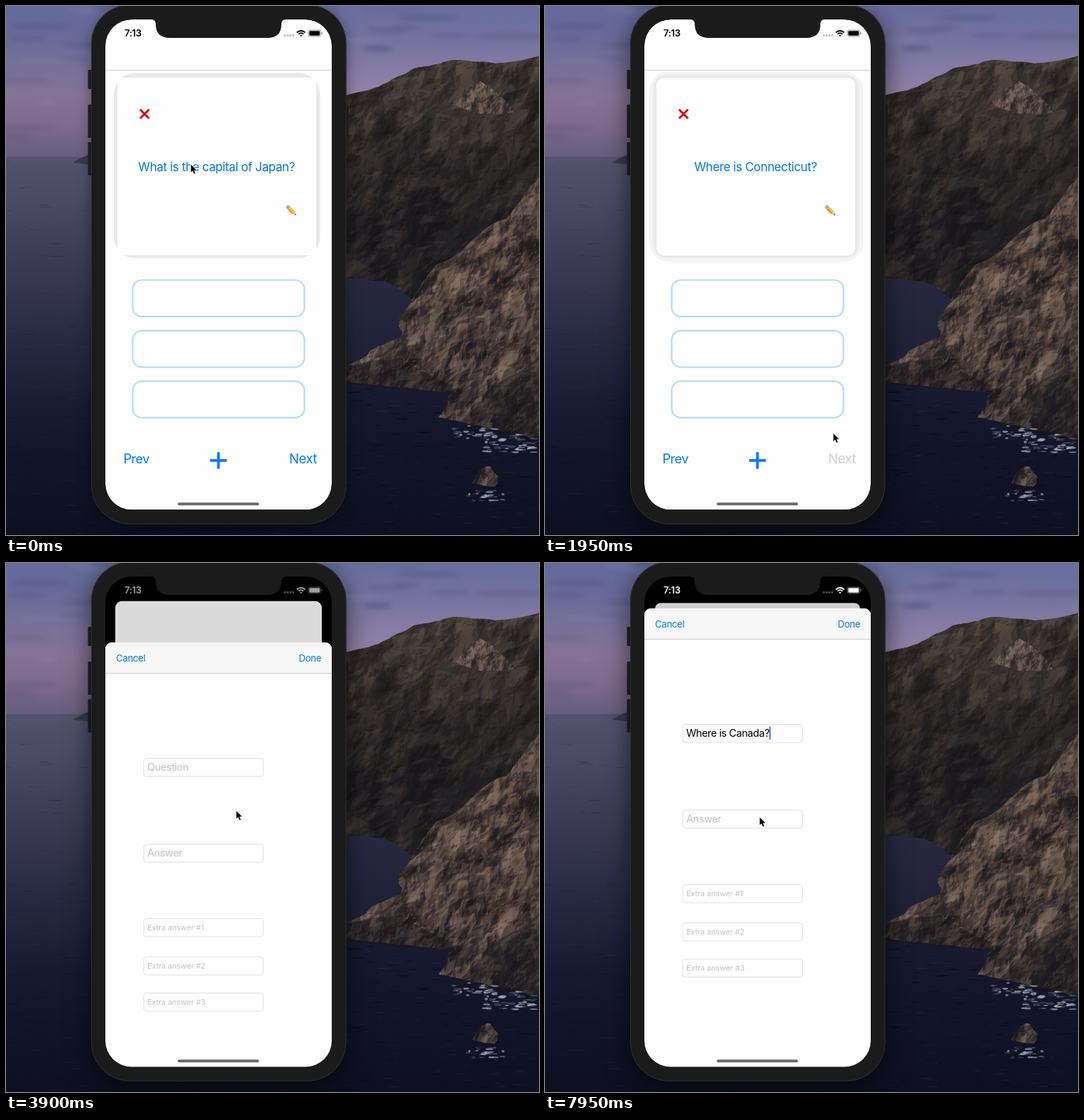
An HTML page with a canvas for the animation above (8 s loop, 751 by 746 pixels).

```html
<!DOCTYPE html>
<html lang="en">
<head>
<meta charset="utf-8">
<title>Flashcards</title>
<style>
html, body { margin: 0; width: 100%; height: 100%; overflow: hidden; background: #15172e; }
canvas { display: block; width: 751px; height: 746px; }
</style>
</head>
<body>
<canvas id="stage" width="751" height="746"></canvas>
<script>
const W = 751, H = 746, LOOP = 8000, STEP = 150;
const BLUE = '#007aff', PALE = '#b3dbff', PAPER = '#fefefe';
const SCREEN = { x: 140, y: 19, w: 319, h: 691.5 };
const stage = document.getElementById('stage').getContext('2d');
let g = stage;

const clamp = v => Math.max(0, Math.min(1, v));
const mix = (a, b, k) => a + (b - a) * k;
const ease = k => k * k * (3 - 2 * k);

function box(x, y, w, h, r, fill, stroke, line = 1) {
  g.beginPath();
  g.roundRect(x, y, w, h, r);
  if (fill) { g.fillStyle = fill; g.fill(); }
  if (stroke) { g.strokeStyle = stroke; g.lineWidth = line; g.stroke(); }
}

function rect(x, y, w, h, fill) {
  g.fillStyle = fill;
  g.fillRect(x, y, w, h);
}

function path(pts, fill) {
  g.beginPath();
  pts.forEach(([x, y]) => g.lineTo(x, y));
  g.closePath();
  if (fill) { g.fillStyle = fill; g.fill(); }
}

function ramp(y0, y1, ...colors) {
  const grad = g.createLinearGradient(0, y0, 0, y1);
  colors.forEach((c, i) => grad.addColorStop(i / (colors.length - 1), c));
  return grad;
}

function label(str, x, y, size, color, track = 0, align = 'left', weight = 400) {
  g.font = `${weight} ${size}px Inter, "Liberation Sans", sans-serif`;
  g.letterSpacing = track + 'px';
  g.textAlign = align;
  g.fillStyle = color;
  g.fillText(str, x, y);
  return g.measureText(str).width;
}

// ---- desktop backdrop, painted once ----
let seed = 4211;
const rnd = () => (seed = (seed * 16807) % 2147483647) / 2147483647;
const spread = s => (rnd() - 0.5) * s;

function streaks(n, x, y, w, h, len, thick, colors) {
  for (let i = 0; i < n; i++) {
    g.fillStyle = colors[i % colors.length];
    g.beginPath();
    g.ellipse(x + rnd() * w, y + rnd() * h, len * (0.3 + rnd()), thick * (0.3 + rnd()), 0, 0, 7);
    g.fill();
  }
}

// Midpoint displacement turns a few key points into a jagged outline.
function rough(pts, amount) {
  for (let pass = 0; pass < 3; pass++, amount /= 2) {
    pts = pts.flatMap(([x, y], i) => i + 1 < pts.length
      ? [[x, y], [mix(x, pts[i + 1][0], 0.5) + spread(amount), mix(y, pts[i + 1][1], 0.5) + spread(amount)]]
      : [[x, y]]);
  }
  return pts;
}

// Facets run down the slope and shrink from broad planes to fine grain.
function terrain(pts, fill, n, slope, tones) {
  const xs = pts.map(p => p[0]), ys = pts.map(p => p[1]);
  const left = Math.min(...xs), top = Math.min(...ys);
  const w = Math.max(...xs) - left, h = Math.max(...ys) - top;
  g.save();
  path(pts, fill);
  g.clip();
  for (let i = 0; i < n; i++) {
    const s = 3 + 32 * (1 - i / n) ** 4, a = slope + spread(1.3);
    const x = left + rnd() * w, y = top + rnd() * h;
    const dx = Math.cos(a) * s, dy = Math.sin(a) * s, k = 0.15 + rnd() * 0.3;
    path([[x - dx, y - dy], [x - dy * k, y + dx * k + spread(s)], [x + dx, y + dy], [x + dy * k, y - dx * k]],
      tones[i % tones.length]);
  }
  g.restore();
}

function paintBackdrop() {
  rect(0, 0, W, 214, ramp(0, 214, '#636b9c', '#686a97', '#77709a', '#857395', '#7d6a8c', '#655d7c'));
  rect(470, 0, 281, 130, ramp(0, 130, 'rgba(140,135,180,.1)', 'rgba(165,150,190,.45)'));
  g.filter = 'blur(3px)';
  streaks(60, 0, 0, W, 190, 42, 4, ['rgba(72,76,120,.32)', 'rgba(150,140,175,.25)', 'rgba(90,85,125,.35)']);
  g.filter = 'none';
  rect(0, 213, W, H, ramp(213, H, '#54536d', '#454560', '#363650', '#262841', '#191b32', '#111327', '#0d0f21'));
  streaks(500, 0, 222, 480, 524, 10, 0.6, ['rgba(10,11,30,.2)', 'rgba(100,100,130,.09)']);
  path([[94, 221], [108, 213], [122, 208], [122, 224]], '#3a394a');

  rect(470, 370, 180, 150, ramp(370, 510, '#292a42', '#1d1f35'));
  rect(470, 510, 281, 236, ramp(510, H, '#1a1c32', '#121428', '#0d0f21'));
  streaks(170, 480, 540, 270, 200, 8, 0.7, ['rgba(5,7,20,.45)', 'rgba(58,62,90,.22)']);

  const ridge = rough([[470, 129], [525, 114], [575, 88], [630, 76], [690, 81], [755, 69]], 5);
  const shore = rough([[755, 430], [570, 412], [530, 388], [470, 381]], 6);
  terrain([...ridge, ...shore], ramp(75, 390, '#52463f', '#423a36', '#302c2c', '#232226', '#1d1d22'), 2400, 2.3,
    ['rgba(20,19,22,.3)', 'rgba(98,83,73,.16)', 'rgba(33,33,29,.3)', 'rgba(22,21,25,.28)']);
  terrain(rough([[622, 138], [668, 106], [722, 152], [655, 148]], 12), 'rgba(95,81,74,.4)', 500, 1.9,
    ['rgba(135,116,104,.35)', 'rgba(42,36,36,.4)']);

  const crest = rough([[755, 236], [705, 300], [640, 347], [585, 392], [553, 440], [556, 468], [478, 508]], 12);
  const foot = rough([[478, 529], [625, 546], [609, 580], [690, 598], [755, 614]], 7);
  terrain([...crest, ...foot], ramp(240, 610, '#685549', '#5b4b42', '#4b3f3b', '#2d282c'), 4200, 2.2,
    ['rgba(24,21,25,.38)', 'rgba(150,127,110,.3)', 'rgba(62,51,47,.35)', 'rgba(26,23,28,.36)', 'rgba(116,97,84,.3)']);
  path(rough([[478, 508], [556, 496], [630, 535], [625, 547], [478, 531]], 6), 'rgba(24,22,28,.45)');
  path(rough([[755, 490], [675, 545], [640, 590], [755, 615]], 12), 'rgba(22,20,27,.4)');

  const foam = ['rgba(190,193,210,.6)', 'rgba(110,115,140,.4)', 'rgba(18,20,40,.7)'];
  streaks(60, 630, 592, 60, 18, 5, 1.2, foam);
  streaks(90, 675, 604, 76, 26, 5, 1.6, foam);
  streaks(45, 648, 683, 56, 15, 5, 1.3, foam);
  terrain(rough([[657, 673], [668, 654], [683, 650], [694, 664], [688, 678], [657, 673]], 4), '#463d3b', 60, 2.2,
    ['rgba(24,21,25,.4)', 'rgba(125,108,98,.3)']);
}

const backdrop = document.createElement('canvas');
backdrop.width = W;
backdrop.height = H;
g = backdrop.getContext('2d');
paintBackdrop();
g = stage;

// ---- phone ----
function drawBody(focused) {
  for (const [x, y, h] of [[115.5, 90, 27], [115.5, 139, 47], [115.5, 192, 47], [477.5, 139, 47]])
    box(x, y, 5.5, h, 1.5, '#232326');
  g.save();
  g.shadowColor = focused ? 'rgba(0,0,0,.6)' : 'rgba(0,0,0,.4)';
  g.shadowBlur = focused ? 36 : 20;
  g.shadowOffsetY = focused ? 10 : 5;
  box(120, -2, 359.5, 733, 55, '#1b1b1b');
  g.restore();
  box(120.5, -1.5, 358.5, 732, 54.5, null, '#2e2e30');
}

function drawNotch() {
  g.fillStyle = '#1b1b1b';
  g.beginPath();
  g.moveTo(205, 18);
  g.lineTo(205, 19);
  g.quadraticCurveTo(211, 19, 211, 26);
  g.quadraticCurveTo(211, 45, 231, 45);
  g.lineTo(368, 45);
  g.quadraticCurveTo(388, 45, 388, 26);
  g.quadraticCurveTo(388, 19, 394, 19);
  g.lineTo(394, 18);
  g.fill();
}

function drawStatus(shade) {
  const c = `rgb(${shade},${shade},${shade})`;
  label('7:13', 167, 43, 13, c, -0.3, 'left', 600);
  for (let i = 0; i < 4; i++) rect(391.5 + i * 3.9, 40, 2.8, 2.8, shade > 60 ? '#4a4a4a' : '#c2c2c2');
  g.strokeStyle = c;
  g.lineWidth = 1.9;
  for (const r of [8, 4.8, 1.4]) {
    g.beginPath();
    g.arc(415.7, 43, r, -Math.PI * 0.76, -Math.PI * 0.24);
    g.stroke();
  }
  g.globalAlpha = 0.45;
  box(426, 34, 17.5, 9, 2.5, null, c, 0.9);
  rect(444.6, 37, 1.2, 3, c);
  g.globalAlpha = 1;
  box(427.3, 35.3, 14.9, 6.4, 1.4, c);
}

// ---- flashcard screen ----
function drawPencil() {
  g.save();
  g.translate(402, 288.3);
  g.rotate(Math.PI / 4);
  box(-9, -2.6, 4, 5.2, 1.2, '#e58f8d');
  rect(-6.2, -2.6, 2, 5.2, '#a9aaad');
  rect(-4.2, -2.6, 9, 5.2, '#f6c432');
  rect(-4.2, 0.9, 9, 1.7, '#d58f1c');
  path([[4.8, -2.6], [9.6, 0], [4.8, 2.6]], '#e7c193');
  path([[7.7, -1], [9.8, 0], [7.7, 1]], '#333');
  g.restore();
}

function drawCard(t) {
  const answer = t >= 2400 && t < 2850;
  const bottom = answer ? 330 : 352;
  if (t < STEP) {
    box(152, 94.5, 290.5, 261, 30, '#e9e9e9');
    box(157, 101, 280, 250.5, 4, PAPER);
  } else {
    box(147, 92, 301.5, bottom - 83, 28, '#f4f4f4');
    box(152, 96, 291, bottom - 92, 20, '#ededed');
    box(155, 99, 284.5, bottom - 97, 13, '#e7e7e7');
    box(157, 101, 280, bottom - 101, 11, answer ? PALE : PAPER);
  }
  if (answer) label('Under New York', 296.5, 230, 36, '#fff', -1.3, 'center');
  else label(t >= 1650 ? 'Where is Connecticut?' : 'What is the capital of Japan?', 296.7, 233, 17, '#0078e4', -0.4, 'center');
  g.strokeStyle = '#e00505';
  g.lineWidth = 3;
  g.beginPath();
  g.moveTo(189, 146); g.lineTo(201.5, 158.5);
  g.moveTo(201.5, 146); g.lineTo(189, 158.5);
  g.stroke();
  drawPencil();
}

function drawApp(t) {
  rect(SCREEN.x, SCREEN.y, SCREEN.w, SCREEN.h, PAPER);
  g.save();
  g.beginPath();
  g.rect(SCREEN.x, 91, SCREEN.w, SCREEN.h);
  g.clip();
  drawCard(t);
  g.restore();
  rect(SCREEN.x, 90, SCREEN.w, 1, '#cfcfcf');
  for (let i = 0; i < 3; i++) box(178.5, 386.5 + i * 71.3, 242, 51.5, 13, null, PALE, 2.2);
  label('Prev', 165.5, 645.3, 18.3, BLUE, -0.6);
  label('Next', 399, 645.3, 18.5, t >= 1650 ? '#cfcfcf' : BLUE, -0.4);
  const plus = t >= 3600 ? '#c9e2ff' : BLUE;
  rect(287.5, 639, 23.5, 3.8, plus);
  rect(297.4, 629.2, 3.8, 23.4, plus);
}

// ---- new card sheet ----
const PACE = 108;
const BURSTS = [[5580, 'Where '], [6420, 'is '], [6840, 'Canada'], [7690, '?']];
const typedAt = t => BURSTS.map(([at, s]) => s.slice(0, Math.max(0, Math.floor((t - at) / PACE)))).join('');

function drawField(y, hint, size, text = '') {
  box(194, y + 0.5, 168.5, 25.5, 4, PAPER, '#e0e0e0');
  const base = y + 13 + size * 0.365;
  if (!text) label(hint, 199, base, size, '#c3c3c6', size > 12 ? -0.4 : -0.05);
  return text ? label(text, 199, base, size, '#000', -0.44) : 0;
}

function drawSheet(t, top) {
  box(SCREEN.x, top, SCREEN.w, H, [9, 9, 0, 0], PAPER);
  box(SCREEN.x, top, SCREEN.w, 43, [9, 9, 0, 0], '#f7f7f7');
  rect(SCREEN.x, top + 43, SCREEN.w, 1, '#cdcdcd');
  label('Cancel', 155, top + 26.8, 13.3, BLUE, -0.4);
  label('Done', 412.5, top + 26.8, 13.3, BLUE, -0.4);

  const text = typedAt(t);
  const width = drawField(top + 163, 'Question', 14.5, text);
  drawField(top + 284, 'Answer', 14.5);
  [389, 443, 494].forEach((dy, i) => drawField(top + dy, `Extra answer #${i + 1}`, 10.8));
  if (t >= 4950 && (text || t < 5500)) rect(199 + width, top + 166.5, 1.7, 18.5, '#4263e8');
}

// ---- pointer: glides as start, end, x, y ----
const GLIDES = [[100, 1050, 274, 263], [1050, 1600, 424, 643], [1850, 2350, 249, 250], [2850, 3600, 305, 635],
  [3650, 3900, 324, 349], [3900, 4950, 299, 225], [7800, 7950, 302, 358]];

function drawPointer(t) {
  let x = 260, y = 223;
  for (const [from, to, nx, ny] of GLIDES) {
    const k = ease(clamp((t - from) / (to - from)));
    x = mix(x, nx, k);
    y = mix(y, ny, k);
  }
  g.save();
  g.translate(x, y);
  path([[0.6, 0.8], [0.6, 11.6], [3.1, 9.3], [5, 13.7], [6.8, 12.9], [5, 8.7], [8.4, 8.6]]);
  g.lineJoin = 'round';
  g.strokeStyle = '#fff';
  g.lineWidth = 1.6;
  g.stroke();
  g.fillStyle = '#000';
  g.fill();
  g.restore();
}

function draw(t) {
  const { x, y, w, h } = SCREEN;
  g.drawImage(backdrop, 0, 0);
  drawBody(t >= STEP);
  g.save();
  box(x, y, w, h, 37, '#000');
  g.clip();

  // Critically damped spring for the sheet.
  const since = Math.max(0, t - 3650), s = since * 0.017;
  const p = 1 - (1 + s) * Math.exp(-s);
  g.save();
  g.translate(mix(x, 155, p), mix(y, 56.3, p));
  g.scale(1 - 0.094 * p, 1 - 0.094 * p);
  g.translate(-x, -y);
  g.beginPath();
  g.roundRect(x, y, w, h, mix(37, 9, p));
  g.clip();
  drawApp(t);
  rect(x, y, w, h, `rgba(0,0,0,${0.18 * p ** 3})`);
  g.restore();

  if (p > 0) drawSheet(t, Math.round(mix(711, 64, p)));
  box(242, 700.3, 114.5, 4, 2, '#6b6b6b');
  drawNotch();
  drawStatus(Math.round(255 * clamp(since / 400)));
  g.restore();
  drawPointer(t);
}

const start = performance.now();
function tick() {
  const t = (performance.now() - start) % LOOP;
  draw(Math.floor(t / STEP) * STEP);
  requestAnimationFrame(tick);
}
tick();
</script>
</body>
</html>
```
